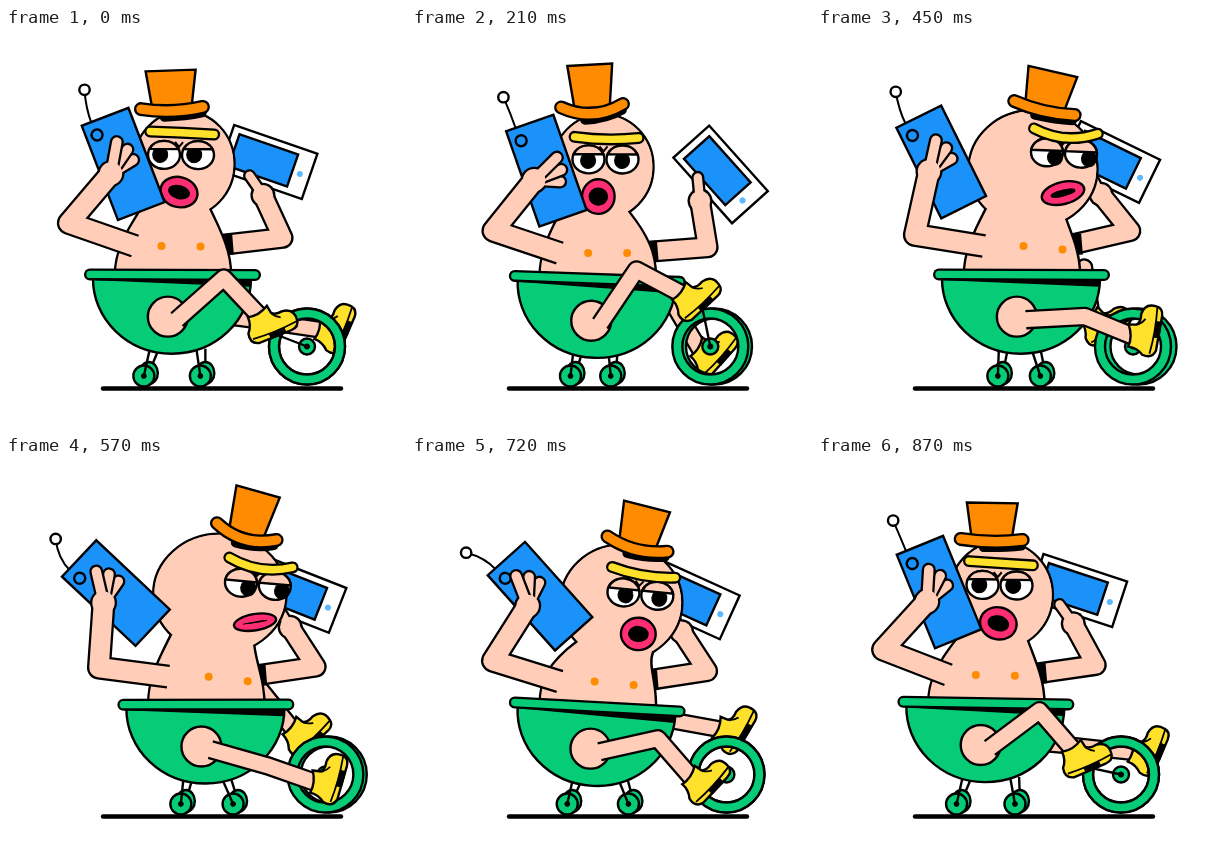
An HTML page that plays this animation: 400x400 px, repeating every 900 ms.

```html
<!DOCTYPE html>
<html lang="en">
<head>
<meta charset="utf-8">
<title>Bathtub ride</title>
<style>
html, body { margin: 0; width: 100%; height: 100%; overflow: hidden; background: #fff; }
svg { display: block; width: 100vw; height: 100vh; }
</style>
</head>
<body>
<svg id="stage" viewBox="0 0 400 400"></svg>
<script>
const stage = document.getElementById('stage');
const LOOP = 900, STEP = 30;
const SKIN = '#ffcdb8', GREEN = '#06cc78', BLUE = '#1b91fa', YELLOW = '#ffe12b',
  ORANGE = '#ff8c00', PINK = '#ff2e73', INK = '#000';

const rad = a => a * Math.PI / 180;
const shift = (p, dx, dy) => [p[0] + dx, p[1] + dy];
// Point (u, v) in the frame of a placed part [x, y, angle].
const turn = ([x, y, a], u, v) => [
  x + u * Math.cos(rad(a)) - v * Math.sin(rad(a)),
  y + u * Math.sin(rad(a)) + v * Math.cos(rad(a))];

// Middle joint of a two-bone limb; side picks the bending direction.
function joint(a, b, l1, l2, side) {
  const dx = b[0] - a[0], dy = b[1] - a[1], d = Math.hypot(dx, dy);
  const along = d > l1 + l2 ? d * l1 / (l1 + l2) : (l1 * l1 - l2 * l2 + d * d) / (2 * d);
  const off = side * Math.sqrt(Math.max(0, l1 * l1 - along * along)) * (d < l1 + l2);
  return [a[0] + (dx * along - dy * off) / d, a[1] + (dy * along + dx * off) / d];
}

// The whole ride is driven by one pedal angle: sway once, bounce twice per turn.
function rig(angle) {
  const C = Math.cos(angle), S = Math.sin(angle);
  const C2 = Math.cos(2 * angle), S2 = Math.sin(2 * angle);
  const wave = (mid, c, s, c2 = 0, s2 = 0) => mid + c * C + s * S + c2 * C2 + s2 * S2;

  const tub = [wave(104.6, -18.5, -1.7, -2.1, -1.1), wave(247, 0, 0, -0.6, 1.6), wave(1.3, 0, 0, -1.1, -1.5)];
  const hip = turn(tub, 78, 42);
  const chest = [tub[0], wave(221.7, 0, 0, -3.7, -1.4)];
  const hub = [wave(308, -7, -9), 318.5];

  const leg = (start, pedal, tilt) => {
    const ankle = turn([...pedal, tilt], -6, -26);
    return { pedal, foot: [...ankle, tilt], knee: joint(start, ankle, 68, 48, -1) };
  };
  const farHip = shift(hip, 15, -6);
  const phone = [wave(124.8, -3, 7.6, -4.8, -12.2), wave(137.8, 1, 1, -3.3), wave(-28.3, 2.7, 14.5, 4.6, -5.4)];
  const slab = [wave(287.2, -15, 12.7, -10.2, 1.8), wave(139.6, 0, 1.5, -5.6, -0.8), wave(29.8, -3.5, 12.2, -7.3, -2.4)];
  const shoulder = shift(chest, 45, 0), farShoulder = shift(chest, 131, -1);
  const palm = shift(phone, -12, 10), farPalm = turn(slab, 6, 33);
  const lips = [wave(18.7, -1.5, -1, 1.5, 1), wave(14.4, 2, 2.1, -1.4, -3.5)];

  return {
    tub, hip, farHip, hub,
    depth: wave(2.5, -3, 1.5),
    leg: leg(hip, shift(hub, -5.5 - 28 * C, -13 - 28 * S), wave(-52.5, 29, 5)),
    farLeg: leg(farHip, shift(hub, 7 + 30 * C, -14 + 27 * S), wave(-52, -16, 4)),
    casters: [
      [shift(hip, -18, 32), [hip[0] + wave(-21.5, -2.5, 1), 348]],
      [shift(hip, wave(21.5, 7, -5), 32), [hip[0] + wave(28, 4.5, -9), 348]]
    ],
    chest,
    head: [wave(199.9, -18.5, -9.4, -3.4, -5.8), wave(140.4, -2.5, -2, -1.9, -5.9), wave(57.5, -7, -6), wave(56, -3, -3)],
    nipple: shift(chest, wave(78, -6.5, -4), 0),
    slope: wave(2, -1.5, -2),
    hat: [wave(202.8, -30, -25.8, -6.8, -2.5), wave(82.8, 0, -2.4, -0.8, -7.2), wave(6.2, -7.5, -8.9, -0.7, -2.2)],
    sag: wave(4.3, 0, 0, -2.3, 2.5),
    crown: wave(41, 0, 0, -1.5, 2.5),
    eyes: [wave(214.6, -35.5, -21, -4.1, -2.5), wave(130.2, 1, -2.3, -4.2, -3.4), wave(2.3, -1, -3, -1)],
    look: [wave(2.2, -6, -2), wave(2.2, -2.5, -0.9)],
    lid: wave(-3.9, -2, -1),
    brow: [1, -21, wave(2.4, 0, -1.6)],
    frown: wave(2.8, -3.5, -1),
    mouth: [wave(211.4, -36, -23, -2.4, -3.8), wave(168.7, -0.5, -3, -4.1, -5.5), 14 * C],
    lips,
    phone, shoulder, palm,
    elbow: joint(shoulder, palm, 70, 65, -1),
    grip: wave(-78.5, -1, 34),
    lean: wave(1, 0, 0, 8, 22),
    slab, farShoulder, farPalm,
    farElbow: joint(farShoulder, farPalm, 62, 47, 1)
  };
}

const path = (d, fill = 'none', w = 2.4) =>
  `<path d="${d}" fill="${fill}" stroke="${INK}" stroke-width="${w}" fill-rule="evenodd"/>`;
const oval = (x, y, rx, ry, fill, w = 2.4) =>
  `<ellipse cx="${x}" cy="${y}" rx="${rx}" ry="${ry}" fill="${fill}" stroke="${INK}" stroke-width="${w}"/>`;
const disc = (p, r, fill, w) => oval(p[0], p[1], r, r, fill, w);
const rect = (x, y, w, h, fill) =>
  `<rect x="${x}" y="${y}" width="${w}" height="${h}" fill="${fill}" stroke="${INK}" stroke-width="2.4"/>`;
const group = ([x, y, a], body) => `<g transform="translate(${x} ${y}) rotate(${a})">${body}</g>`;
const line = (...pts) => 'M' + pts.map(p => p[0] + ' ' + p[1]).join('L');
const band = (d, w, color, cap = 'round') =>
  `<path d="${d}" fill="none" stroke="${color}" stroke-width="${w}" stroke-linecap="${cap}" stroke-linejoin="round"/>`;
const tube = (d, w, color, cap) => band(d, w, INK, cap) + band(d, w - 4.6, color);

const boot = foot => group(foot,
  path('M-11 1Q0 4 11 -2L12 6Q15 10 23 9Q35 11 33 23Q32 30 24 30L-11 29Q-20 26 -17 16Q-11 10 -11 1Z', YELLOW) +
  path('M-15 23Q8 26 32 24M12 7Q15 12 19 14', 'none', 1.8) + path('M2 25H18V30H2Z', INK, 1));

function drawCaster([top, hub]) {
  const [x, y] = hub, back = shift(hub, 5, -3);
  return path(line(shift(top, 9, 0), back)) + oval(...back, 9, 11, GREEN) +
    oval(x, y, 10.5, 10.5, GREEN) + path(line(top, hub)) + disc(hub, 2.4, INK, 1);
}

function ring(x, y) {
  const hoop = r => `M${x - r} ${y}a${r} ${r} 0 1 0 ${2 * r} 0a${r} ${r} 0 1 0 ${-2 * r} 0Z`;
  return path(hoop(38) + hoop(28), GREEN);
}

function drawWheel({ hub, depth, leg }) {
  const [x, y] = hub;
  return ring(x + Math.max(0, depth), y) + ring(x, y) + disc(hub, 8, GREEN) +
    path(line(hub, leg.pedal)) + disc(hub, 2.6, INK, 1);
}

const drawTub = tub => group(tub,
  path('M3 4A79 75 0 0 0 161 4Z', GREEN) + path('M6 5H161L160 11Z', INK, 1.5) +
  tube('M0 0H165', 12, GREEN));

function drawHat({ hat, sag, crown }) {
  const top = 26 - sag / 2, foot = 20 - sag / 3;
  return group(hat,
    band(`M-8 ${sag + 5}Q14 ${sag + 5} 30 4`, 9, INK) +
    path(`M${-top} ${-crown}H${top}L${foot} 0H${-foot}Z`, ORANGE) +
    tube(`M-31 -2Q0 ${sag * 2} 31 -2`, 14, ORANGE));
}

function drawFace({ eyes, look, lid, brow, frown, mouth, lips }) {
  const reach = Math.sqrt(1 - (lid / 14) ** 2) * 16;
  const eye = x => oval(x, 0, 16, 14, '#fff') + oval(x + look[0], look[1], 7.5, 8, INK, 1) +
    path(`M${x - reach} ${lid}A16 14 0 0 1 ${x + reach} ${lid}Z`, SKIN);
  const [rx, ry] = lips;
  return group(eyes, eye(-17) + eye(17) + path('M-6 -13L-2 -8L2 -13', 'none', 2) +
      group(brow, tube(`M-32 -1Q0 ${frown * 2} 32 -1`, 12, YELLOW))) +
    group(mouth, oval(0, 0, rx, ry, PINK) + oval(0, 0, rx * 0.57, ry * 0.9 - 7, INK, 1));
}

function drawTorso({ chest, head, nipple, slope }) {
  const x = chest[0] + 26, [cx, cy, rx, ry] = head;
  const left = cx - rx * 0.72, right = cx + rx * 0.5;
  const belly = `M${x} 248C${x} 225 ${x + 8} 208 ${left} ${cy + ry * 0.69}L${cx} ${cy}` +
    `L${right} ${cy + ry * 0.86}C${x + 106} 208 ${x + 114} 225 ${x + 114} 248Z`;
  return path(belly, SKIN, 4.8) + oval(cx, cy, rx, ry, SKIN) + path(belly, SKIN, 0) +
    oval(cx, cy, rx - 1.2, ry - 1.2, SKIN, 0) +
    disc(nipple, 4, ORANGE, 0) + disc(shift(nipple, 39, slope), 4, ORANGE, 0);
}

function drawArm(shoulder, elbow, palm, w, fingers) {
  const arm = line(shoulder, elbow, palm);
  return band(arm, w, INK, 'butt') + disc(palm, w / 2 + 1.5, INK, 0) + fingers +
    band(arm, w - 4.6, SKIN) + disc(palm, w / 2 - 0.8, SKIN, 0);
}

function drawNearArm({ phone, lean, shoulder, elbow, palm, grip }) {
  const base = turn(phone, -15, -48), bend = turn(phone, -15, -65);
  const tip = turn([...base, phone[2] + lean], 0, -35);
  const fingers = [2, 1, 0].map(i =>
    tube(line(palm, turn([...palm, grip + 24 * i], 32 - 3 * i, 0)), 14, SKIN)).join('');
  return path(`M${base}Q${bend} ${tip}`, 'none', 2) + disc(tip, 5.2, '#fff') +
    group(phone, rect(-25, -50, 50, 101, BLUE) + oval(-14, -36, 5.5, 5.5, 'none')) +
    drawArm(shoulder, elbow, palm, 24, fingers);
}

function drawFarArm({ slab, farShoulder, farElbow, farPalm }) {
  return group(slab, rect(-44, -24, 88, 48, '#fff') + rect(-36, -17, 62, 34, BLUE) +
      oval(34, 1, 3, 3, '#5cb8ff', 0)) +
    drawArm(farShoulder, farElbow, farPalm, 22, tube(line(farPalm, turn(slab, -13, 19)), 13, SKIN)) +
    band(line(farShoulder, shift(farShoulder, 12, -1)), 21, INK, 'butt');
}

function draw(t) {
  const r = rig(2 * Math.PI * t / LOOP);
  const limb = (start, { knee, foot }, w) => tube(line(start, knee, turn(foot, 0, 4)), w, SKIN, 'butt') + boot(foot);
  stage.innerHTML =
    band('M97 360.5H335', 4.4, INK) + r.casters.map(drawCaster).join('') +
    limb(r.farHip, r.farLeg, 18) + drawFarArm(r) +
    drawTorso(r) + drawHat(r) + drawFace(r) + drawNearArm(r) +
    drawTub(r.tub) + drawWheel(r) +
    disc(r.hip, 20, SKIN) + limb(shift(r.hip, 9, 3), r.leg, 19.5);
}

let last = -1;
const start = performance.now();
function tick() {
  const t = Math.floor((performance.now() - start) % LOOP / STEP) * STEP;
  if (t !== last) draw(last = t);
  requestAnimationFrame(tick);
}
tick();
</script>
</body>
</html>
```
